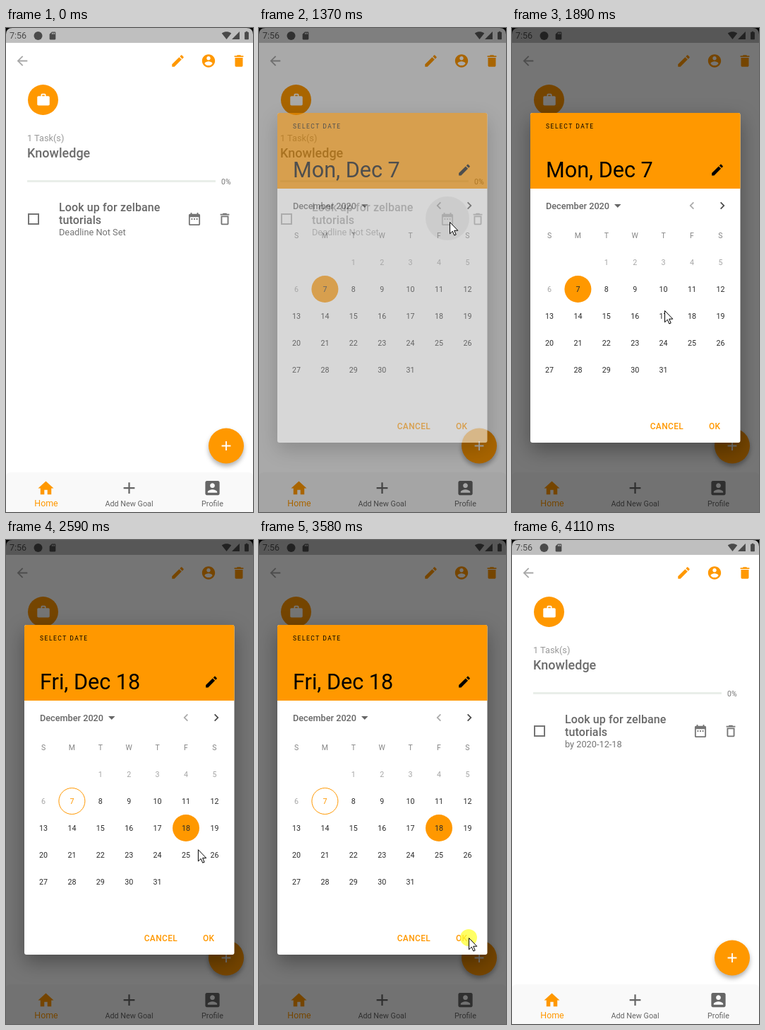
Recreate the animation shown at these times as an HTML page. Size 350x684 px, loop 4650 ms.

```html
<!DOCTYPE html>
<html lang="en">
<head>
<meta charset="utf-8">
<title>Set a deadline</title>
<style>
  html, body { margin: 0; width: 100%; height: 100%; overflow: hidden; background: #fff; }
  svg { display: block; }
  text { font-family: Roboto, sans-serif; white-space: pre; }
  #panel { filter: drop-shadow(0 10px 14px rgba(0, 0, 0, .34)); }
  #fab { filter: drop-shadow(0 4px 3px rgba(0, 0, 0, .3)); }
</style>
</head>
<body>
<svg id="stage" width="350" height="684" viewBox="0 0 350 684"></svg>
<script>
const LOOP = 4650, ORANGE = '#ff9800', GREY = '#757575', DARK = '#4a4a4a';

const ICONS = {
  back: 'M20 11H7.83l5.59-5.59L12 4l-8 8 8 8 1.41-1.41L7.83 13H20z',
  edit: 'M3 17.25V21h3.75L17.81 9.94l-3.75-3.75zM20.71 7.04c.39-.39.39-1.02 0-1.41l-2.34-2.34c-.39-.39-1.02-.39-1.41 0l-1.83 1.83 3.75 3.75z',
  account: 'M12 2C6.48 2 2 6.48 2 12s4.48 10 10 10 10-4.48 10-10S17.52 2 12 2zm0 3c1.66 0 3 1.34 3 3s-1.34 3-3 3-3-1.34-3-3 1.34-3 3-3zm0 14.2c-2.5 0-4.71-1.28-6-3.22.03-1.99 4-3.08 6-3.08 1.99 0 5.97 1.09 6 3.08-1.29 1.94-3.5 3.22-6 3.22z',
  bin: 'M6 19c0 1.1.9 2 2 2h8c1.1 0 2-.9 2-2V7H6zM19 4h-3.5l-1-1h-5l-1 1H5v2h14z',
  binOutline: 'M6 19c0 1.1.9 2 2 2h8c1.1 0 2-.9 2-2V7H6zM8 9h8v10H8zm7.5-5l-1-1h-5l-1 1H5v2h14V4z',
  calendar: 'M9 11H7v2h2zm4 0h-2v2h2zm4 0h-2v2h2zm2-7h-1V2h-2v2H8V2H6v2H5c-1.11 0-2 .9-2 2v14c0 1.1.89 2 2 2h14c1.1 0 2-.9 2-2V6c0-1.1-.9-2-2-2zm0 16H5V9h14z',
  home: 'M10 20v-6h4v6h5v-8h3L12 3 2 12h3v8z',
  plus: 'M19 13h-6v6h-2v-6H5v-2h6V5h2v6h6z',
  profile: 'M3 5v14c0 1.1.89 2 2 2h14c1.1 0 2-.9 2-2V5c0-1.1-.9-2-2-2H5c-1.11 0-2 .9-2 2zm12 4c0 1.66-1.34 3-3 3s-3-1.34-3-3 1.34-3 3-3 3 1.34 3 3zm-9 8c0-2 4-3.1 6-3.1s6 1.1 6 3.1v1H6z',
  work: 'M20 6h-4V4c0-1.11-.89-2-2-2h-4c-1.11 0-2 .89-2 2v2H4c-1.11 0-2 .89-2 2v11c0 1.11.89 2 2 2h16c1.11 0 2-.89 2-2V8c0-1.11-.89-2-2-2zm-6 0h-4V4h4z',
  card: 'M18 2h-8L4 8v12c0 1.1.9 2 2 2h12c1.1 0 2-.9 2-2V4c0-1.1-.9-2-2-2zm-6 6h-2V4h2zm3 0h-2V4h2zm3 0h-2V4h2z',
  wifi: 'M12 21.5 23.6 7C23.2 6.6 18.7 3 12 3S.8 6.6.4 7z',
  signal: 'M2 22h20V2z',
  battery: 'M15.7 4H14V2h-4v2H8.3C7.6 4 7 4.6 7 5.3v15.4c0 .7.6 1.3 1.3 1.3h7.4c.7 0 1.3-.6 1.3-1.3V5.3c0-.7-.6-1.3-1.3-1.3z',
  prev: 'M15.41 7.41L14 6l-6 6 6 6 1.41-1.41L10.83 12z',
  next: 'M10 6L8.59 7.41 13.17 12l-4.58 4.59L10 18l6-6z'
};

const icon = (name, x, y, size, fill) =>
  `<path d="${ICONS[name]}" fill="${fill}" transform="translate(${x} ${y}) scale(${size / 24}) translate(-12 -12)"/>`;
const text = (str, x, y, size, fill, attrs = '') =>
  `<text x="${x}" y="${y}" font-size="${size}" fill="${fill}" ${attrs}>${str}</text>`;
const rect = (x, y, w, h, fill, attrs = '') =>
  `<rect x="${x}" y="${y}" width="${w}" height="${h}" fill="${fill}" ${attrs}/>`;
const circle = (x, y, r, fill, attrs = '') =>
  `<circle cx="${x}" cy="${y}" r="${r}" fill="${fill}" ${attrs}/>`;

const MID = 'text-anchor="middle"', BOLD = 'font-weight="500"';
const TASK = `${BOLD} letter-spacing=".12"`, BUTTON = `${BOLD} letter-spacing=".4"`;

const statusBar = rect(0, 0, 350, 21, '#bfbfbf') +
  text('7:56', 5, 15, 12.5, DARK) +
  circle(45.5, 11, 6, DARK) +
  icon('card', 66, 11, 13, DARK) +
  icon('wifi', 312.5, 10.5, 14, DARK) +
  icon('signal', 325.5, 10.5, 13, DARK) +
  icon('battery', 341, 10.5, 14, DARK) +
  '<path d="M0 0H9Q0 0 0 9zM350 0h-9q9 0 9 9z"/>';

const page = rect(0, 0, 350, 684, '#fff') +
  icon('back', 23, 46.5, 22, '#a8a8a8') +
  icon('edit', 243.5, 46.5, 22, ORANGE) +
  icon('account', 287, 46.5, 22, ORANGE) +
  icon('bin', 330, 46.5, 22, ORANGE) +
  circle(52.5, 101.5, 21.5, ORANGE) +
  icon('work', 53, 101.5, 21, '#fff') +
  text('1 Task(s)', 30, 160, 12.75, '#999') +
  text('Knowledge', 30, 183, 18, '#6c6c6c', BOLD) +
  rect(30, 215, 267, 3, '#e9eee9') +
  text('0%', 305, 220.5, 10.5, GREY) +
  rect(32, 263, 14, 14, 'none', `stroke="${GREY}" stroke-width="2"`) +
  text('Look up for zelbane', 75, 258.5, 16, '#686868', TASK) +
  text('tutorials', 75, 277, 16, '#686868', TASK) +
  text('', 75, 293, 12.75, GREY, 'id="deadline"') +
  circle(267, 269, 0, '#000', 'id="ripple"') +
  icon('calendar', 267, 270, 21.5, GREY) +
  icon('binOutline', 310, 270, 22, GREY) +
  circle(312, 590.5, 25, ORANGE, 'id="fab"') +
  icon('plus', 312, 590.5, 22, '#fff') +
  '<path d="M0 684V634Q0 628 7 628H343q7 0 7 6v50z" fill="#f9f9f9"/>' +
  icon('home', 56.5, 650.5, 26.5, ORANGE) +
  icon('plus', 174.5, 650, 27, '#666') +
  icon('profile', 292.5, 650, 27, '#666') +
  text('Home', 57, 675.5, 12.4, ORANGE, MID) +
  text('Add New Goal', 174.5, 676, 10.8, '#666', MID) +
  text('Profile', 292.5, 676, 10.8, '#666', MID);

const cellX = col => 53 + 40.4 * col;
const cellY = row => 331 + 38 * row;

function monthGrid() {
  let out = [...'SMTWTFS'].map((d, i) => text(d, cellX(i), 297, 10.5, '#858585', MID)).join('');
  for (let day = 1; day <= 31; day++) {
    const cell = day + 1;
    out += text(day, cellX(cell % 7), cellY(Math.floor(cell / 7)) + 4, 10.7,
      day < 7 ? '#a5a5a5' : '#2a2a2a', `${MID} id="day${day}"`);
  }
  return out;
}

const dialog = rect(26, 120, 297.5, 466, '#fff', 'rx="3" id="panel"') +
  `<path d="M26 227V123q0-3 3-3H320.5q3 0 3 3V227z" fill="${ORANGE}"/>` +
  text('SELECT DATE', 48, 142, 8.5, '#000', 'letter-spacing="1.5"') +
  text('', 48, 211, 30.6, '#000', 'id="chosen"') +
  icon('edit', 291, 200.5, 21, '#000') +
  text('December 2020', 48, 255.5, 12.7, '#666', BOLD) +
  '<path d="M145 249h9.5l-4.75 5z" fill="#666"/>' +
  icon('prev', 255, 251, 21, '#aaa') +
  icon('next', 298, 251, 21, DARK) +
  circle(cellX(1), cellY(1), 18.5, 'none', `stroke="${ORANGE}" id="today"`) +
  circle(0, 0, 19, ORANGE, 'id="selected"') +
  monthGrid() +
  text('CANCEL', 195.7, 567, 11.9, ORANGE, BUTTON) +
  text('OK', 279, 567, 11.9, ORANGE, BUTTON);

document.getElementById('stage').innerHTML = page + statusBar +
  rect(0, 0, 350, 684, '#000', 'id="scrim"') +
  `<g id="dialog">${dialog}</g>` +
  `<g id="cursor">${circle(0, 0, 12, '#ffff30', 'id="press" opacity=".75"')}` +
  '<path d="M.5.5V16.8L4.3 13.2 6.8 19 9.2 18 6.7 12.2H11.8z" fill="#fff" stroke="#000"/></g>';

const el = id => document.getElementById(id);
const set = (id, attrs) => Object.entries(attrs).forEach(([k, v]) => el(id).setAttribute(k, v));
const clamp = v => Math.min(1, Math.max(0, v));
const within = (t, from, to) => t >= from && t < to;

// Screen updates come in bursts: start, end, number of updates
const BURSTS = [[0, 0, 1], [440, 750, 5], [900, 1370, 7], [1440, 1890, 7], [1970, 2430, 7],
  [2510, 2970, 7], [3200, 3280, 2], [3580, 4050, 7], [4110, 4110, 1]];
const TICKS = BURSTS.flatMap(([a, b, n]) =>
  Array.from({ length: n }, (_, i) => n > 1 ? Math.round((a + (b - a) * i / (n - 1)) / 10) * 10 : a));

// Pointer tip: time, x, y
const PATH = [[440, 322, 640], [590, 300, 410], [750, 275, 264], [900, 275, 264], [980, 270, 274],
  [1440, 270, 274], [1890, 216, 399], [1970, 181, 424], [2050, 186, 392], [2130, 235, 342],
  [2210, 282, 352], [2350, 262, 409], [2510, 262, 409], [2890, 309, 543], [2970, 298, 561],
  [3200, 297, 562], [3740, 297, 562], [4050, 330, 656]];

function pointAt(t) {
  const i = Math.max(1, PATH.findIndex(p => p[0] >= t));
  const [t0, x0, y0] = PATH[i - 1], [t1, x1, y1] = PATH[i];
  const k = clamp((t - t0) / (t1 - t0));
  return [x0 + (x1 - x0) * k, y0 + (y1 - y0) * k];
}

function render(time) {
  const t = TICKS.findLast(tick => tick <= time);
  const picked = t >= 2510;
  const open = Math.min(clamp((t - 1290) / 150), clamp(1 - (t - 3700) / 150));

  el('deadline').textContent = t < 3700 ? 'Deadline Not Set' : 'by 2020-12-18';
  set('ripple', {
    r: 31 * clamp((t - 900) / 350),
    opacity: .13 * clamp((1600 - t) / 160)
  });

  set('scrim', { opacity: .54 * open ** .75 });
  set('dialog', { opacity: open });
  el('chosen').textContent = picked ? 'Fri, Dec 18' : 'Mon, Dec 7';
  set('selected', picked ? { cx: cellX(5), cy: cellY(2) } : { cx: cellX(1), cy: cellY(1) });
  set('today', { opacity: +picked });
  set('day7', { fill: picked ? ORANGE : '#2a2a2a' });

  const shown = within(t, 440, 4110);
  set('cursor', { visibility: shown ? 'visible' : 'hidden' });
  if (shown) set('cursor', { transform: `translate(${pointAt(t)})` });
  const pressed = within(t, 980, 1140) || within(t, 2350, 2510) || within(t, 3580, 3740);
  set('press', { opacity: pressed ? .75 : 0 });
}

const start = performance.now();
function tick() {
  render((performance.now() - start) % LOOP);
  requestAnimationFrame(tick);
}
tick();
</script>
</body>
</html>
```
